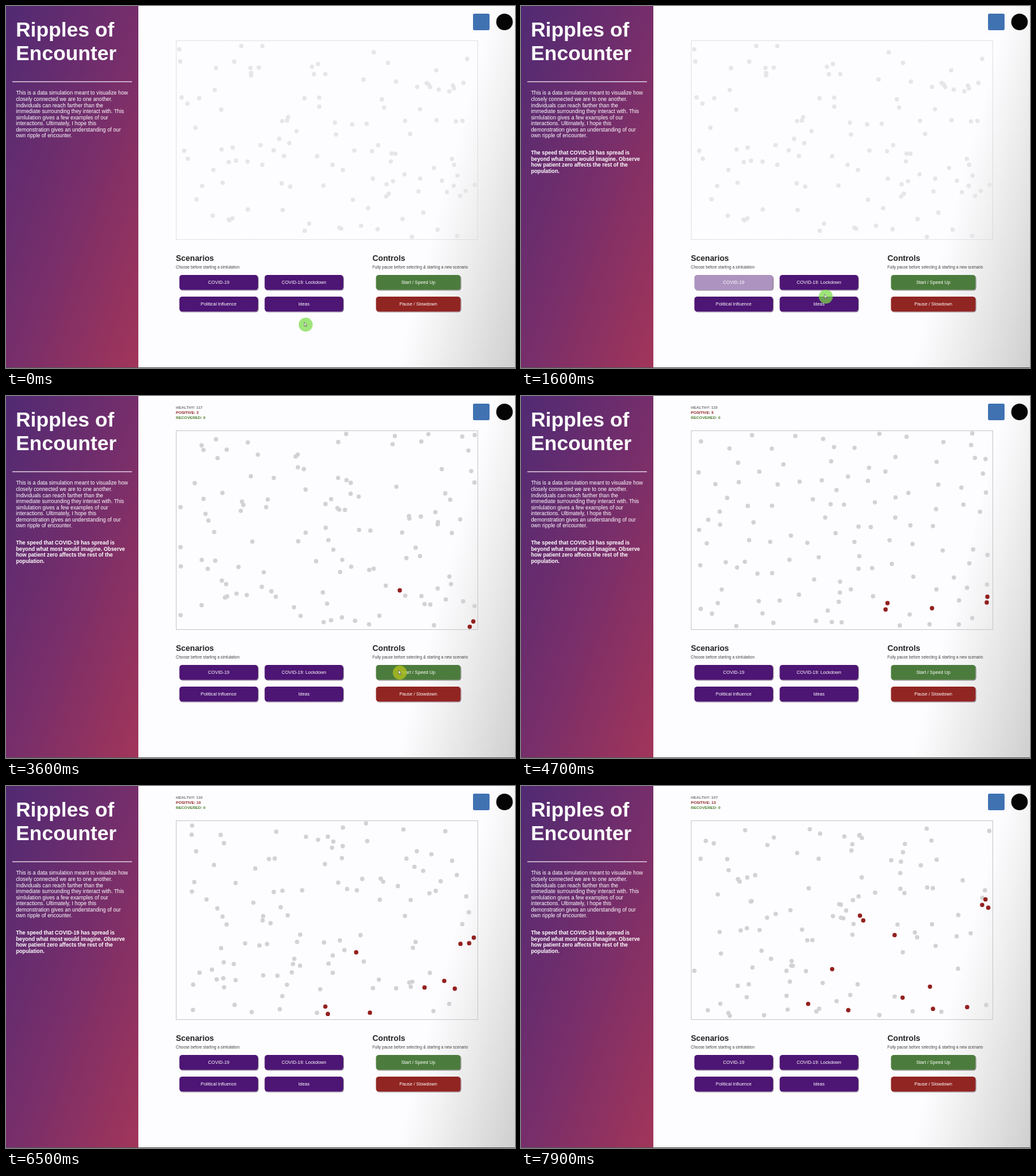
Write an HTML page that moves like this. It is 800 px wide and 568 px high and loops after 8000 ms.

```html
<!DOCTYPE html>
<html lang="en">
<head>
<meta charset="utf-8">
<title>Ripples of Encounter</title>
<style>
  html, body { margin: 0; width: 100%; height: 100%; overflow: hidden; }
  #stage {
    position: relative; width: 800px; height: 568px; overflow: hidden;
    background: linear-gradient(105deg, #fdfcfe 75%, #f1f1f2 82%, #cfcfd0 100%) 208px 0 / 592px 568px no-repeat;
  }
  #side {
    position: absolute; left: 0; top: 0; width: 207.5px; height: 568px;
    background: linear-gradient(110deg, #502a73, #762e6b 50%, #a23559);
  }
  svg { position: absolute; left: 0; top: 0; }
  text { font-family: "Liberation Sans", Arial, sans-serif; white-space: pre; }
  .bold { font-weight: bold; }
  .button { font-size: 7.24px; fill: #fff; text-anchor: middle; }
</style>
</head>
<body>
<div id="stage">
  <div id="side"></div>
  <svg id="art" width="800" height="568" viewBox="0 0 800 568"></svg>
</div>
<script>
const LOOP = 8000, STEP = 100, SELECT = 1100, START = 1900, CURSOR_END = 4000;
const TOTAL = 120, CASES = 13, SPEED = 0.043, ANCHOR = 4700;
const FIELD = { left: 271.5, top: 58.5, right: 737.5, bottom: 362.5 };

// Place at ANCHOR and heading in degrees of the dots that start the outbreak.
const firstCases = [
  [576, 325, 155], [732, 324, 267], [733, 315, 275], [646, 333, 163], [573, 335, 253]
];

// Time, x, y
const cursorPath = [
  [200, 471, 500], [800, 336, 434], [1200, 336, 434], [1600, 479, 456], [1900, 619, 434]
];

const art = document.getElementById('art');

function add(tag, attrs, content, parent = art) {
  const node = document.createElementNS('http://www.w3.org/2000/svg', tag);
  for (const key in attrs) node.setAttribute(key, attrs[key]);
  if (content) node.textContent = content;
  parent.appendChild(node);
  return node;
}

function label(x, y, size, fill, content, cls = '', parent = art) {
  return add('text', { x, y, 'font-size': size, fill, class: cls }, content, parent);
}

function paragraph(y, lines, cls, parent) {
  lines.forEach((line, i) => label(15.7, y + i * 9.57, 8.33, '#fff', line, cls, parent));
}

function button(x, y, width, fill, content) {
  const box = { x, y, width, height: 23.5, rx: 4.5 };
  add('rect', { ...box, x: x + 1, y: y + 1, fill: '#857b8b' });
  add('rect', { ...box, fill: '#fdfcfe' });
  const face = add('rect', { ...box, fill });
  add('text', { x: x + width / 2, y: y + 13.9, class: 'button' }, content);
  return face;
}

function seeded(seed) {
  return () => {
    seed = (seed * 1664525 + 1013904223) >>> 0;
    return seed / 4294967296;
  };
}

const mix = (a, b, k) => a + (b - a) * k;

// Reflects a straight path between two walls.
function fold(v, low, high) {
  const span = high - low;
  const m = (((v - low) % (2 * span)) + 2 * span) % (2 * span);
  return low + (m > span ? 2 * span - m : m);
}

// Position along rows of [time, x, y].
function along(rows, t) {
  let i = 0;
  while (i < rows.length - 2 && t > rows[i + 1][0]) i++;
  const [a, b] = [rows[i], rows[i + 1]];
  const k = Math.min(1, Math.max(0, (t - a[0]) / (b[0] - a[0])));
  return [mix(a[1], b[1], k), mix(a[2], b[2], k)];
}

// Sidebar
label(15.5, 48, 32, '#fff', 'Ripples of', 'bold');
label(15.5, 85, 32, '#fff', 'Encounter', 'bold');
add('rect', { x: 10, y: 118, width: 188, height: 1.5, fill: '#d5c3d6' });
paragraph(139.4, [
  'This is a data simulation meant to visualize how',
  'closely connected we are to one another.',
  'Individuals can reach farther than the',
  'immediate surrounding they interact with. This',
  'simlulation gives a few examples of our',
  'interactions. Ultimately, I hope this',
  'demonstration gives an understanding of our',
  'own ripple of encounter.'
]);
const story = add('g', {});
paragraph(233, [
  'The speed that COVID-19 has spread is',
  'beyond what most would imagine. Observe',
  'how patient zero affects the rest of the',
  'population.'
], 'bold', story);

// Header marks and counters
add('rect', { x: 734, y: 12, width: 26, height: 26, rx: 2, fill: '#4072b2' });
add('circle', { cx: 783.5, cy: 25, r: 13, fill: '#050505' });
const counters = ['#777', '#8e2421', '#4a7f2c'].map((fill, i) =>
  label(267, 19.5 + i * 8, 6.2, fill, '', 'bold'));

// Field and controls
const frame = add('rect', { x: 267.5, y: 54.5, width: 474, height: 312, fill: 'none' });
label(267, 400, 12.5, '#222', 'Scenarios', 'bold');
label(267, 411.7, 6.27, '#444', 'Choose before starting a simlulation');
label(576, 400, 12.5, '#222', 'Controls', 'bold');
label(576, 411.7, 6.27, '#444', 'Fully pause before selecting & starting a new scenario');
const [covid] = ['COVID-19', 'COVID-19: Lockdown', 'Political Influence', 'Ideas'].map((name, i) =>
  button(272.5 + (i % 2) * 134, 422 + (i >> 1) * 34, 123.5, '#4d1574', name));
button(581.5, 422, 133, '#4c7c3d', 'Start / Speed Up');
button(581.5, 456, 133, '#912522', 'Pause / Slowdown');
add('rect', { x: 0, y: 567, width: 800, height: 1, fill: '#555' });

// Dots
const random = seeded(41);
const dots = firstCases.map(([x, y, degrees]) => ({ x, y, angle: degrees * Math.PI / 180 }));

while (dots.length < TOTAL) {
  // Of a few random spots, keep the one farthest from the others.
  let best = { gap: -1 };
  for (let n = 0; n < 4; n++) {
    const x = mix(FIELD.left, FIELD.right, random());
    const y = mix(FIELD.top, FIELD.bottom, random());
    const gap = Math.min(...dots.map(d => Math.hypot(d.x - x, d.y - y)));
    if (gap > best.gap) best = { x, y, gap };
  }
  dots.push({ ...best, angle: random() * Math.PI * 2 });
}

function place(dot, t) {
  const way = SPEED * (Math.max(t, START) - ANCHOR);
  return [
    fold(dot.x + Math.cos(dot.angle) * way, FIELD.left, FIELD.right),
    fold(dot.y + Math.sin(dot.angle) * way, FIELD.top, FIELD.bottom)
  ];
}

function distance(a, b, t) {
  const [ax, ay] = place(a, t), [bx, by] = place(b, t);
  return Math.hypot(ax - bx, ay - by);
}

// After the first cases, the healthy dot closest to a sick one is next.
const sick = [];
for (let i = 0; i < CASES; i++) {
  const time = START + 6000 * (i / CASES) ** 0.75;
  const risk = dot => Math.min(...sick.map(other => distance(dot, other, time)));
  const next = i < firstCases.length ? dots[i] :
    dots.filter(dot => !sick.includes(dot)).reduce((a, b) => risk(b) < risk(a) ? b : a);
  next.caught = time;
  sick.push(next);
}
for (const dot of dots) dot.node = add('circle', { r: 3.4 });
for (const dot of sick) art.appendChild(dot.node);

// Pointer
const cursor = add('g', {});
const halo = add('circle', { r: 11 }, '', cursor);
add('path', {
  d: 'M-2-4V2.5L-.6 1.2.4 3.4 1.3 3 .4.9H2.2Z',
  fill: '#fff', stroke: '#444', 'stroke-width': 0.6
}, '', cursor);

function draw(t) {
  const running = t >= START;
  const positive = sick.filter(dot => t >= dot.caught).length;

  story.setAttribute('visibility', t >= SELECT ? 'visible' : 'hidden');
  covid.setAttribute('opacity', t >= SELECT && !running ? 0.45 : 1);
  frame.setAttribute('stroke', running ? '#c9c9cb' : '#d4d4d6');
  frame.setAttribute('stroke-dasharray', running ? 'none' : '2 1');

  [`HEALTHY: ${TOTAL - positive}`, `POSITIVE: ${positive}`, 'RECOVERED: 0']
    .forEach((line, i) => { counters[i].textContent = running ? line : ''; });

  for (const dot of dots) {
    const [x, y] = place(dot, t);
    dot.node.setAttribute('cx', x);
    dot.node.setAttribute('cy', y);
    dot.node.setAttribute('fill', t >= dot.caught ? '#93201f' : running ? '#d2d1d3' : '#e6e5e7');
  }

  const [x, y] = along(cursorPath, t);
  cursor.setAttribute('transform', `translate(${x} ${y})`);
  cursor.setAttribute('visibility', t < CURSOR_END ? 'visible' : 'hidden');
  halo.setAttribute('fill', running ? 'rgba(174,190,30,.8)' : 'rgba(122,220,72,.72)');
}

const origin = performance.now();
function tick() {
  const t = (performance.now() - origin) % LOOP;
  draw(Math.floor(t / STEP) * STEP);
  requestAnimationFrame(tick);
}
tick();
</script>
</body>
</html>
```
